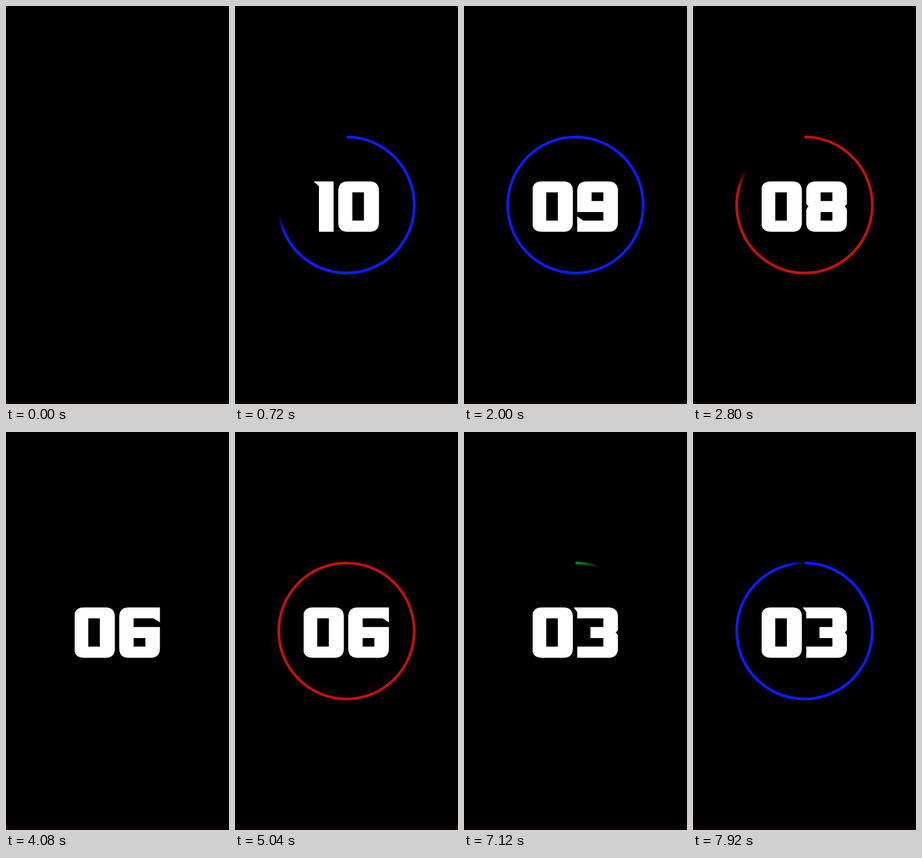
An HTML page that plays this animation: 380 px wide and 676 px high, repeating every 8 s.

```html
<!DOCTYPE html>
<html lang="en">
<head>
<meta charset="utf-8">
<title>Countdown</title>
<style>
  html, body { margin: 0; width: 100%; height: 100%; overflow: hidden; background: #000; }
  svg { display: block; width: 100vw; height: 100vh; }
</style>
</head>
<body>
<svg viewBox="0 0 380 676" role="img" aria-label="Countdown">
  <defs><clipPath id="edge"><rect x="117" y="280" width="200" height="120"/></clipPath></defs>
  <rect width="380" height="676"/>
  <rect y="673" width="380" height="3" fill="#0a0309"/>
  <g id="ring" fill="none" stroke-width="4.7"></g>
  <g clip-path="url(#edge)" fill="#fff" fill-rule="evenodd">
    <path id="tens"/>
    <path id="ones"/>
  </g>
</svg>
<script>
const LOOP = 8000, STEP = 80, START = 80, SECOND = 1000;
const CX = 190, CY = 338, R = 115.5;
const BLUR = 8, SLICES = 10; // soft leading edge, in degrees either side
const COLORS = ['#087a16', '#c01408', '#0a1eff'];

// Glyph parts on a 69.3 x 85.5 cell
const TL = 'M0 16Q0 0 16 0', TR = 'H53.3Q69.3 0 69.3 16';
const BR = 'V69.5Q69.3 85.5 53.3 85.5', BL = 'H16Q0 85.5 0 69.5';
const SPUR = 'M0 8L-6 0';
const WAIST_R = 'V36Q69.3 40 65.3 42.5Q69.3 45 69.3 49';
const WAIST_L = 'V49Q0 45 4 42.5Q0 40 0 36Z';
const TOP_HOLE = 'M24.5 18.5H44.5V33.2H24.5Z', LOW_HOLE = 'M24.5 52H44.5V66.5H24.5Z';
const HOOK = 'H69.3V25.5L58.5 18.5H24.5V33.2H69.3';

const GLYPHS = {
  0: TL + TR + BR + BL + 'Z M24 18.5H43.7V66.5H24Z',
  1: 'M9 8L0 0H34V85.5H9Z',
  3: SPUR + TR + WAIST_R + BR + 'H0V66.5H44.5V52H22.5V33.2H44.5V18.5H0Z',
  4: 'M0 0H24.5V33.2H44.5V0H69.3V85.5H44.5V52H0Z',
  5: SPUR + HOOK + BR + 'H0V66.5H44.5V52H0Z',
  6: TL + HOOK + BR + BL + 'Z' + LOW_HOLE,
  7: SPUR + TR + 'V85.5H44.5V18.5H0Z',
  8: TL + TR + WAIST_R + BR + BL + WAIST_L + TOP_HOLE + LOW_HOLE,
  9: TL + TR + BR + 'H0V59.5L10.5 66.5H44.5V52H0Z' + TOP_HOLE
};

const byId = id => document.getElementById(id);
const ring = byId('ring');
const arcs = Array.from({ length: SLICES + 1 }, (_, i) => {
  const arc = document.createElementNS('http://www.w3.org/2000/svg', 'path');
  if (i) arc.setAttribute('stroke-opacity', 1 - (i - 0.5) / SLICES);
  return ring.appendChild(arc);
});

function point(deg) {
  const a = deg * Math.PI / 180;
  return (CX + R * Math.sin(a)).toFixed(3) + ' ' + (CY - R * Math.cos(a)).toFixed(3);
}

function arcPath(from, to) {
  from = Math.max(0, from);
  to = Math.min(360, to);
  if (to <= from) return '';
  const mid = (from + to) / 2;
  return `M${point(from)}A${R} ${R} 0 0 1 ${point(mid)}A${R} ${R} 0 0 1 ${point(to)}`;
}

function drawRing(progress, color) {
  const done = progress >= 1;
  const tip = progress * 360;
  const slice = 2 * BLUR / SLICES;
  ring.setAttribute('stroke', color);
  arcs.forEach((arc, i) => {
    const from = tip - BLUR + (i - 1) * slice;
    let d = '';
    if (i === 0) d = arcPath(0, done ? 360 : tip - BLUR);
    else if (!done && progress > 0) d = arcPath(from, from + slice);
    arc.setAttribute('d', d);
  });
}

function place(id, digit, x) {
  const glyph = byId(id);
  glyph.setAttribute('d', digit === null ? '' : GLYPHS[digit]);
  glyph.setAttribute('transform', `translate(${x} 298)`);
}

function drawNumber(n) {
  if (n === null) {
    place('tens', null, 0);
    place('ones', null, 0);
  } else if (n === 10) {
    place('tens', 1, 134);
    place('ones', 0, 176);
  } else {
    place('tens', 0, 116.2);
    place('ones', n, 193);
  }
}

function render(time) {
  const t = Math.floor((time % LOOP) / STEP) * STEP;
  const since = t - START;
  if (since < 0) {
    drawNumber(null);
    drawRing(0, COLORS[0]);
    return;
  }
  const u = (since % SECOND) / SECOND;
  const color = COLORS[Math.floor((t + 200) / 400) % COLORS.length];
  drawNumber(10 - Math.floor(since / SECOND));
  drawRing(Math.min(1, 0.9 * u + 0.32 * u * u), color);
}

let begin = null;
function tick(now) {
  if (begin === null) begin = now;
  render(now - begin);
  requestAnimationFrame(tick);
}
render(0);
requestAnimationFrame(tick);
</script>
</body>
</html>
```
